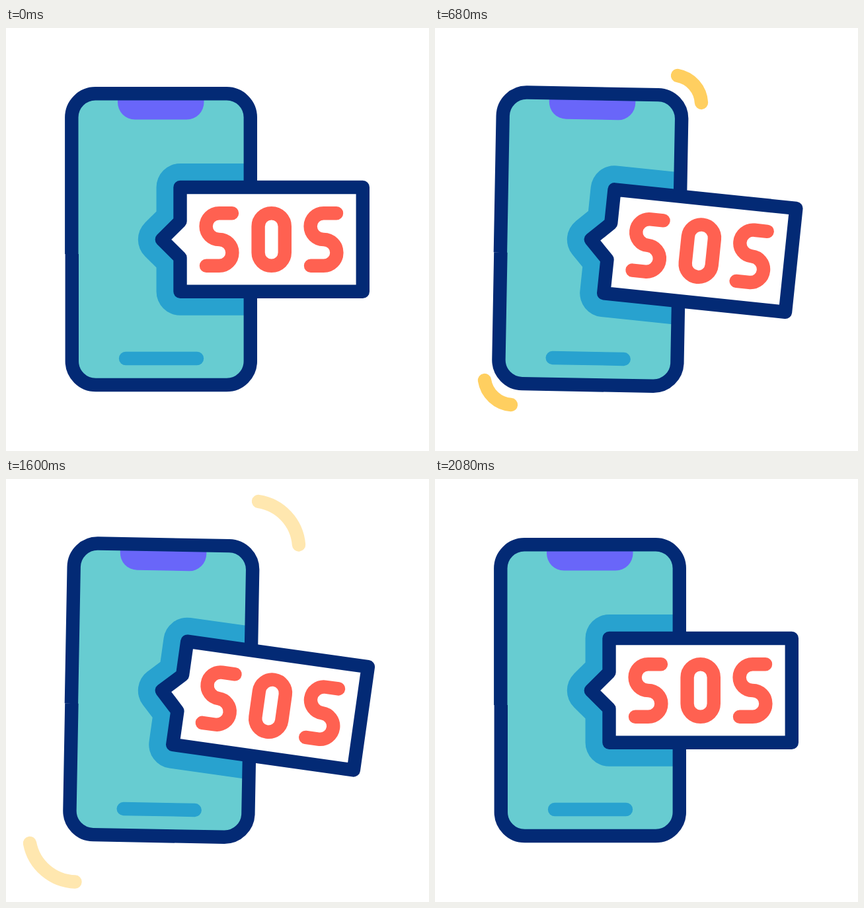
Animation, 640 px wide and 640 px high, one loop 2.44 s. Source, as an HTML page:

```html
<!DOCTYPE html>
<html lang="en">
<head>
<meta charset="utf-8">
<title>SOS call</title>
<style>
  html, body { margin: 0; width: 100%; height: 100%; overflow: hidden; background: #fff; }
  svg { display: block; width: 100%; height: 100%; }
  .line { fill: none; stroke: #032a75; stroke-width: 20.4; stroke-linejoin: round; }
  .shade { fill: #28a2cf; stroke: #28a2cf; stroke-width: 72; stroke-linejoin: round; }
  .bar { stroke: #28a2cf; }
  .sos { stroke: #ff6151; }
  .arc { stroke: #ffcf60; }
  .bar, .sos, .arc { fill: none; stroke-width: 20.4; stroke-linecap: round; }
</style>
</head>
<body>
<svg viewBox="0 0 640 640">
  <defs>
    <clipPath id="screen"><rect x="99.5" y="99.3" width="270.3" height="440.7" rx="36"/></clipPath>
    <path id="balloon" d="M263.5 241H539.8V398.8H263.5V347.5L235.8 320L263.5 292.5Z"/>
    <path id="s" d="M342 280.2H322.5a19.9 19.9 0 0 0 0 39.8a19.9 19.9 0 0 1 0 39.8H303"/>
  </defs>
  <g id="all">
    <g id="phone">
      <rect x="99.5" y="99.3" width="270.3" height="440.7" rx="36" fill="#67ccd1"/>
      <path d="M169 100H299.5V112a26 26 0 0 1 -26 26.5H195a26 26 0 0 1 -26 -26.5Z" fill="#6966f9"/>
      <path class="bar" d="M181 500H289"/>
      <g clip-path="url(#screen)"><use id="shade" class="shade" href="#balloon"/></g>
      <path class="line" d="M99.3 342V135.3a36 36 0 0 1 36 -36H333.8a36 36 0 0 1 36 36V504a36 36 0 0 1 -36 36H135.8a36 36 0 0 1 -36 -36V342"/>
    </g>
    <g id="bubble">
      <use class="line" href="#balloon" style="fill:#fff"/>
      <g class="sos">
        <use href="#s"/>
        <rect x="381.6" y="280.2" width="40.2" height="79.6" rx="20"/>
        <use href="#s" x="158"/>
      </g>
    </g>
  </g>
  <path id="arcTop" class="arc"/>
  <path id="arcLow" class="arc"/>
</svg>
<script>
  const STEP = 40, FRAMES = 61;
  // start and length in steps, first swing direction, phone tilt, delays of bubble and arcs
  const BURSTS = [
    { start: 5, len: 21, dir: -1, tilt: -2.75, lag: 0, arcLag: 0 },
    { start: 32, len: 20, dir: 1, tilt: -3.1, lag: 0.1, arcLag: 0.6 }
  ];
  const SWING = 12.1;
  const PULSE = 9.5;
  // x1, y1, x2, y2, radius: near and far from the phone
  const ARCS = {
    arcTop: { near: [367, 72, 403, 113, 44], far: [382, 34, 443, 99.5, 72], sweep: 1 },
    arcLow: { near: [75, 533, 115, 570, 44], far: [36, 551, 104.5, 609.5, 72], sweep: 0 }
  };

  const el = id => document.getElementById(id);
  const ramp = (a, b, x) => Math.min(1, Math.max(0, (x - a) / (b - a)));
  const ease = k => (1 - Math.cos(Math.PI * k)) / 2;

  function pose(n) {
    const b = BURSTS.find(b => n > b.start && n < b.start + b.len);
    if (!b) return { tilt: 0, swing: 0, alpha: 0, spread: 0 };
    const u = n - b.start, w = u - b.lag, v = u - b.arcLag;
    // triangle wave with a period of three steps, lowest at u = 1
    const tilt = u < 20 ? (u % 3 === 1 ? b.tilt : 1.05) : 0;
    const swing = b.dir * SWING *
      (ease(ramp(0.9, 5.1, w)) - 2 * ease(ramp(5.1, 15.5, w)) + ease(ramp(15.5, 20.8, w)));
    const p = v < PULSE ? v : v - PULSE;
    return {
      tilt, swing,
      alpha: ramp(0, 2, p) * (1 - ease(ramp(5.2, 9.6, p))),
      spread: ease(ramp(2.5, 5.5, p))
    };
  }

  function draw(n) {
    const { tilt, swing, alpha, spread } = pose(n);
    const turn = `rotate(${swing} 235.8 320)`, at = "234.6 319.6";
    const shift = Math.max(0, -tilt) * 0.18;
    el("all").setAttribute("transform", `translate(${shift} ${shift / 2})`);
    el("phone").setAttribute("transform", `rotate(${tilt} ${at})`);
    el("shade").setAttribute("transform", `rotate(${-tilt} ${at}) ${turn}`);
    el("bubble").setAttribute("transform", turn);
    for (const id in ARCS) {
      const { near, far, sweep } = ARCS[id];
      const [x1, y1, x2, y2, r] = near.map((c, i) => c + (far[i] - c) * spread);
      el(id).setAttribute("d", `M${x1} ${y1}A${r} ${r} 0 0 ${sweep} ${x2} ${y2}`);
      el(id).setAttribute("opacity", alpha);
    }
  }

  const t0 = performance.now();
  function tick() {
    draw(Math.floor((performance.now() - t0) / STEP) % FRAMES);
    requestAnimationFrame(tick);
  }
  tick();
</script>
</body>
</html>
```
